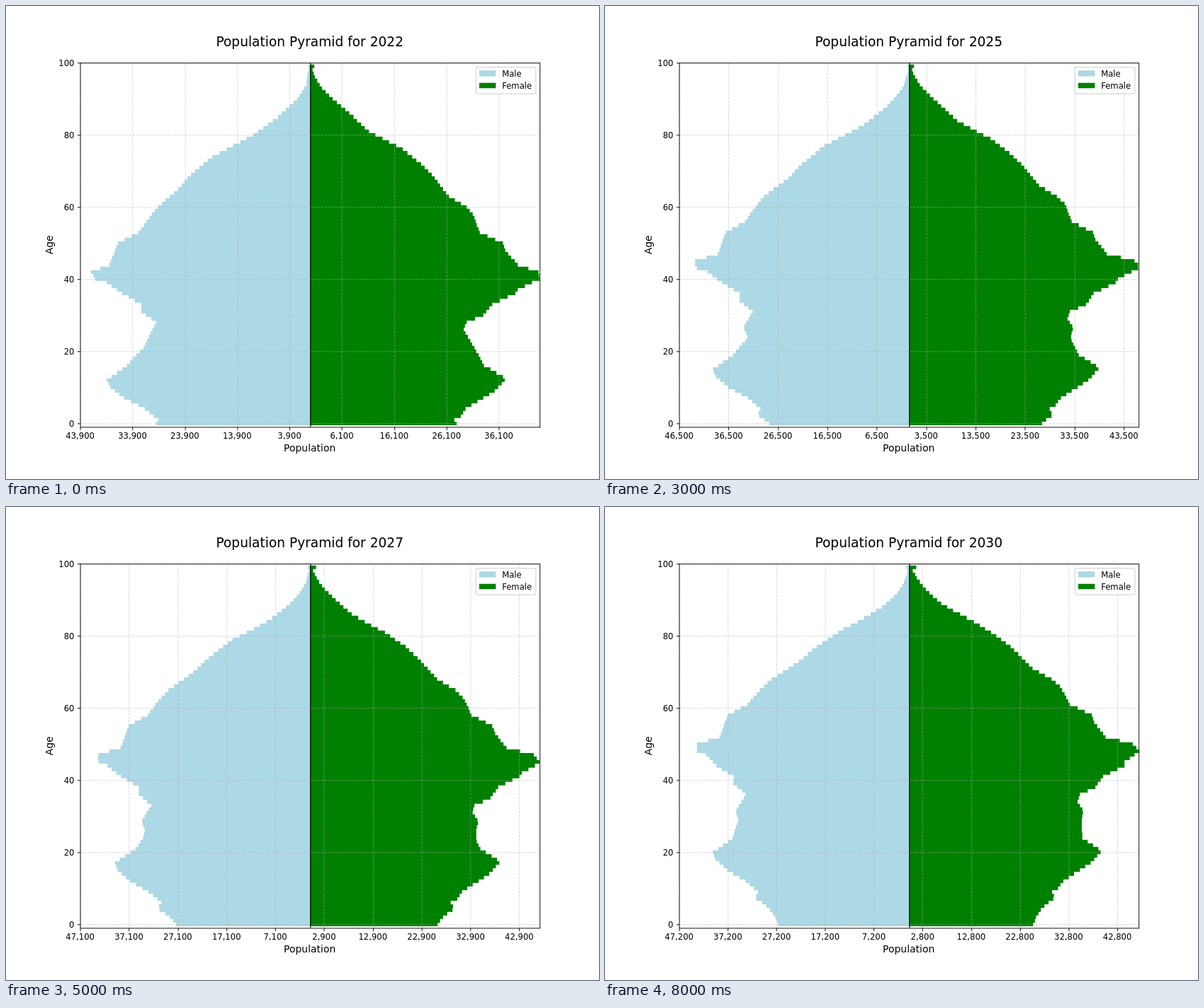
These frames come from a looping animation (837x669 px, 9000 ms). An HTML page:

```html
<!DOCTYPE html>
<html lang="en">
<head>
<meta charset="utf-8">
<title>Population Pyramid</title>
<style>
  html, body { margin: 0; width: 100%; height: 100%; overflow: hidden; background: #fff; }
  svg { display: block; width: 837px; height: 669px; font-family: "DejaVu Sans", sans-serif; }
  .tick { font-size: 13.89px; }
  .label { font-size: 16.67px; text-anchor: middle; }
  .title { font-size: 22.22px; text-anchor: middle; }
  .grid { stroke: #b0b0b0; stroke-opacity: .55; stroke-width: 1.11; stroke-dasharray: 4.11 1.78; }
  .mark { stroke: #000; stroke-width: 1.11; }
</style>
</head>
<body>
<svg viewBox="0 0 1000 800" preserveAspectRatio="none">
  <defs><clipPath id="plot"><rect x="125" y="96" width="775" height="616"/></clipPath></defs>
  <g clip-path="url(#plot)">
    <path id="male" fill="#add8e6"/>
    <path id="female" fill="#008000"/>
  </g>
  <g id="xAxis"></g>
  <g id="yAxis"></g>
  <path d="M513.5 96V712" stroke="#000" stroke-width="1.39"/>
  <rect x="125.5" y="96.5" width="775" height="616" fill="none" class="mark"/>
  <text id="title" class="title" x="512.2" y="68"></text>
  <text class="label" x="512.2" y="753.3">Population</text>
  <text class="label" transform="translate(78.7 404) rotate(-90)">Age</text>
  <rect x="792.5" y="103.5" width="101" height="45" rx="2.8" fill="#fff" fill-opacity=".8" stroke="#ccc" stroke-opacity=".8" stroke-width="1.39"/>
  <rect x="798" y="109" width="28" height="10" fill="#add8e6"/>
  <rect x="798" y="130" width="28" height="9" fill="#008000"/>
  <text class="tick" x="836.5" y="119.3">Male</text>
  <text class="tick" x="836.5" y="139.6">Female</text>
</svg>
<script>
const FIRST_YEAR = 2022, STEP_MS = 1000, AGES = 100;
const LIMITS = [43900, 45000, 45800, 46500, 47000, 47100, 47100, 47100, 47200];
const UNIT = LIMITS[0] / 324.3;      // people per unit of the starting profile
const MID = 512.5, HALF = 387.5, TOP = 96, BASE = 712;

// profile: [age, size] at the start; moves: [age, yearly net migration]
const groups = {
  male: {
    side: -1, birthShare: 1, hazard: .031, growth: .1185,
    profile: [[0, 217], [1, 214], [4, 233], [7, 262], [10, 282], [12, 287], [16, 258], [18, 250], [21, 235],
      [28, 217], [31, 238], [33, 238], [36, 265], [39, 287], [40, 303], [42, 309], [44, 283], [50, 271],
      [53, 242], [60, 215], [65, 186], [69, 168], [74, 138], [77, 108], [80, 80], [85, 45], [90, 18],
      [94, 5], [98, 2], [100, 2]],
    moves: [[0, 250], [7, 260], [19, 130], [22, 150], [24, 640], [28, 560], [32, 490], [43, 470],
      [44, 100], [60, 190], [66, 0], [100, 0]]
  },
  female: {
    side: 1, birthShare: .953, hazard: .021, growth: .124,
    profile: [[0, 207], [1, 204], [2, 213], [4, 220], [9, 261], [12, 275], [13, 272], [16, 246], [20, 235],
      [26, 217], [28, 221], [30, 245], [33, 257], [36, 290], [37, 293], [40, 324], [42, 323], [44, 293],
      [48, 276], [50, 272], [53, 240], [58, 230], [60, 221], [63, 196], [69, 172], [72, 157], [76, 131],
      [81, 83], [86, 56], [90, 32], [93, 17], [96, 7], [98, 4], [99, 6], [100, 6]],
    moves: [[0, 210], [16, 270], [22, 290], [24, 720], [28, 650], [43, 630], [44, 110], [58, 160],
      [62, 60], [80, 0], [100, 0]]
  }
};

const $ = id => document.getElementById(id);
const births = t => 26300 + 3400 * Math.exp(-.27 * t);
const inflow = t => .5 + 1.15 * Math.exp(-.3 * t);

function lerpTable(table, x) {
  const i = table.findIndex(p => p[0] > x);
  const [x0, y0] = table[i - 1], [x1, y1] = table[i];
  return y0 + (y1 - y0) * (x - x0) / (x1 - x0);
}

// Every cohort grows one year older, losing deaths and gaining migrants.
function project(group) {
  const first = Array.from({ length: AGES }, (_, age) => lerpTable(group.profile, age) * UNIT);
  const years = [first];
  for (let t = 0; t < LIMITS.length - 1; t++) {
    const next = [births(t) * group.birthShare];
    years[t].slice(0, AGES - 2).forEach((n, age) => {
      const deaths = group.hazard * Math.exp(group.growth * (age - 75.5));
      next.push(n * Math.exp(-deaths) + lerpTable(group.moves, age) * inflow(t));
    });
    next.push(first[AGES - 1] * (1 + .1 * (t + 1)));   // open-ended oldest group
    years.push(next);
  }
  return years;
}

const ageY = age => BASE - (age + 1) * (BASE - TOP) / 101;
const snap = v => Math.round(v) + .5;

function barsPath(counts, side, limit) {
  let d = `M513 ${Math.round(ageY(-.5))}`;
  counts.forEach((n, age) => {
    d += `H${Math.round(MID + side * n / limit * HALF)}V${Math.round(ageY(age + .5))}`;
  });
  return d + 'H513Z';
}

function xTicks(limit) {
  let out = '';
  for (let v = -limit; v <= limit; v += 10000) {
    const x = MID + v / limit * HALF, sx = snap(x);
    out += `<path class="grid" d="M${sx} ${BASE}V${TOP}"/><path class="mark" d="M${sx} 712.5v4.86"/>` +
      `<text class="tick" x="${x}" y="732.2" text-anchor="middle">${Math.abs(v).toLocaleString('en-US')}</text>`;
  }
  return out;
}

function yTicks() {
  let out = '';
  for (let age = 0; age <= 100; age += 20) {
    const y = ageY(age), sy = snap(y);
    out += `<path class="grid" d="M125 ${sy}H900"/><path class="mark" d="M125.5 ${sy}h-4.86"/>` +
      `<text class="tick" x="115.3" y="${y + 5.28}" text-anchor="end">${age}</text>`;
  }
  return out;
}

for (const name in groups) groups[name].years = project(groups[name]);
$('yAxis').innerHTML = yTicks();

function draw(step) {
  const limit = LIMITS[step];
  for (const name in groups) {
    const g = groups[name];
    $(name).setAttribute('d', barsPath(g.years[step], g.side, limit));
  }
  $('xAxis').innerHTML = xTicks(limit);
  $('title').textContent = `Population Pyramid for ${FIRST_YEAR + step}`;
}

const begin = performance.now();
let shown = -1;
function tick() {
  const step = Math.floor((performance.now() - begin) / STEP_MS) % LIMITS.length;
  if (step !== shown) draw(shown = step);
  requestAnimationFrame(tick);
}
tick();
</script>
</body>
</html>
```
